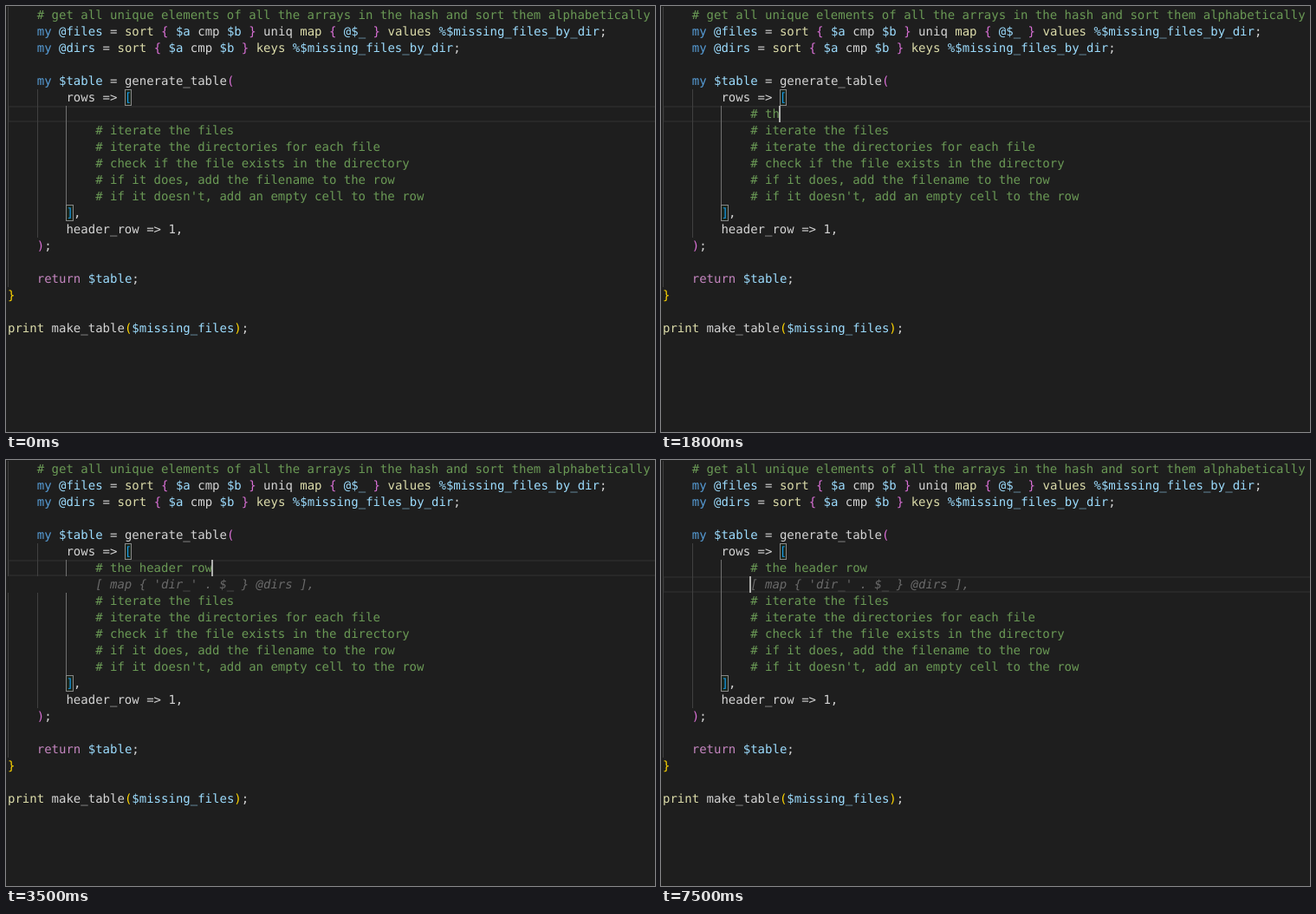
These frames come from a looping animation (749x491 px, 8 s). An HTML page:

```html
<!DOCTYPE html>
<html lang="en">
<head>
<meta charset="utf-8">
<title>Code editor</title>
<style>
  html, body { margin: 0; width: 100%; height: 100%; overflow: hidden; background: #1e1e1e; }
  #editor {
    position: relative; width: 749px; height: 491px; overflow: hidden;
    font: 14px/19px "DejaVu Sans Mono", monospace;
    color: #d4d4d4; white-space: pre; text-rendering: geometricPrecision;
    font-variant-ligatures: none;
  }
  #editor div { position: absolute; }
  .row { left: 2px; height: 19px; padding-top: 1px; }
  .guide { top: 0; width: 1px; height: 19px; background: #404040; }
  .guide.active { background: #707070; }
  #line { left: 2px; width: 760px; height: 19px; box-sizing: border-box; border: 2px solid #282828; }
  #cursor { width: 2px; height: 19px; background: #aeafad; }
  .comment { color: #6a9955; }
  .decl { color: #569cd6; }
  .flow { color: #c586c0; }
  .func { color: #dcdcaa; }
  .var { color: #9cdcfe; }
  .b0 { color: #ffd700; }
  .b1 { color: #da70d6; }
  .b2 { color: #179fff; }
  .match { display: inline-block; position: relative; height: 19px; vertical-align: top; }
  .match::before {
    content: ""; position: absolute; left: 0; right: 0; top: -1px; height: 19px;
    background: rgba(0, 100, 0, .1); box-shadow: inset 0 0 0 1px #888;
  }
  .ghost { color: #6a6a6a; font-style: italic; }
</style>
</head>
<body>
<div id="editor"><div id="line"></div></div>
<script>
const CHAR = 14 * 1233 / 2048, ROW = 19, LEFT = 2, TOP = 1;
const LOOP = 8000, EDIT = 6;
const PAD = ' '.repeat(12);

const head = [
  '    # get all unique elements of all the arrays in the hash and sort them alphabetically',
  '    my @files = sort { $a cmp $b } uniq map { @$_ } values %$missing_files_by_dir;',
  '    my @dirs = sort { $a cmp $b } keys %$missing_files_by_dir;',
  '    ',
  '    my $table = generate_table(',
  '        rows => ['
];
const tail = [
  PAD + '# iterate the files',
  PAD + '# iterate the directories for each file',
  PAD + '# check if the file exists in the directory',
  PAD + '# if it does, add the filename to the row',
  PAD + "# if it doesn't, add an empty cell to the row",
  '        ],',
  '        header_row => 1,',
  '    );',
  '    ',
  '    return $table;',
  '}',
  '',
  'print make_table($missing_files);'
];
const suggestion = `${PAD}[ map { 'dir_' . $_ } @dirs ],`;

// start, typed text, inline suggestion, next row: '' | ghost | empty | both
const steps = [
  [0, '', '', ''],
  [600, '#', '', ''],
  [1400, '# ', '', ''],
  [1600, '# ', 'header row', 'ghost'],
  [1800, '# th', '', ''],
  [1900, '# the', '', ''],
  [2100, '# the h', '', ''],
  [2200, '# the he', '', ''],
  [2800, '# the head', '', ''],
  [3100, '# the head', 'er row', 'ghost'],
  [3200, '# the header', ' row', 'ghost'],
  [3300, '# the header ', 'row', 'ghost'],
  [3400, '# the header ro', 'w', 'ghost'],
  [3500, '# the header row', '', 'ghost'],
  [3600, '# the header row', '', 'empty'],
  [3700, '# the header row', '', 'both']
];
// the cursor starts hidden and toggles at these times
const blinks = [400, 1100, 1400, 4000, 4600, 5000, 5600, 6000, 6600, 7000, 7500];

const editor = document.getElementById('editor');
const line = document.getElementById('line');
const span = (cls, text) => `<span class="${cls}">${text}</span>`;

let depth = 1;
function highlight(code) {
  const token = /(#.*)|\b(my)\b|\b(return)\b|\b(sort|map|keys|values|print)\b|([$@%]\$?\w+)|([{(\[])|([})\]])/g;
  return code.replace(token, (m, comment, decl, flow, func, variable, open) => {
    if (comment) return span('comment', m);
    if (decl) return span('decl', m);
    if (flow) return span('flow', m);
    if (func) return span('func', m);
    if (variable) return span('var', m);
    const level = open ? depth++ : --depth;
    return span(`b${level}${/[\[\]]/.test(m) ? ' match' : ''}`, m);
  });
}

function guides(count) {
  let html = '';
  for (let i = 0; i < count; i++) {
    const x = Math.round(LEFT + i * 4 * CHAR) - LEFT;
    html += `<div class="guide${i === 2 ? ' active' : ''}" style="left:${x}px"></div>`;
  }
  return html;
}

function addRow(parent, index, html) {
  const row = document.createElement('div');
  row.className = 'row';
  row.style.top = TOP + index * ROW + 'px';
  row.innerHTML = html;
  return parent.appendChild(row);
}

const codeRow = text => guides(text.match(/^ */)[0].length / 4) + highlight(text);

head.forEach((text, i) => addRow(editor, i, codeRow(text)));
const editRow = addRow(editor, EDIT, '');
const nextRow = addRow(editor, EDIT + 1, '');
const rest = editor.appendChild(document.createElement('div'));
rest.style.left = 0;
tail.forEach((text, i) => addRow(rest, EDIT + 1 + i, codeRow(text)));
const cursor = editor.appendChild(document.createElement('div'));
cursor.id = 'cursor';

function show([, typed, hint, next]) {
  const entered = next === 'empty' || next === 'both';
  const col = PAD.length + (entered ? 0 : typed.length);
  const top = TOP + (EDIT + (entered ? 1 : 0)) * ROW + 'px';
  editRow.innerHTML = guides(3) + PAD + span('comment', typed) + span('ghost', hint);
  nextRow.innerHTML = (entered ? guides(3) : '') +
    (next === 'ghost' || next === 'both' ? span('ghost', suggestion) : '');
  rest.style.top = (next ? ROW : 0) + 'px';
  line.style.top = cursor.style.top = top;
  cursor.style.left = Math.round(LEFT + col * CHAR - 1) + 'px';
}

let current = null;
function frame() {
  const t = performance.now() % LOOP;
  const step = steps.filter(s => s[0] <= t).pop();
  if (step !== current) show(current = step);
  const lit = blinks.filter(b => b <= t).length % 2;
  cursor.style.visibility = lit ? 'visible' : 'hidden';
  requestAnimationFrame(frame);
}
frame();
</script>
</body>
</html>
```
